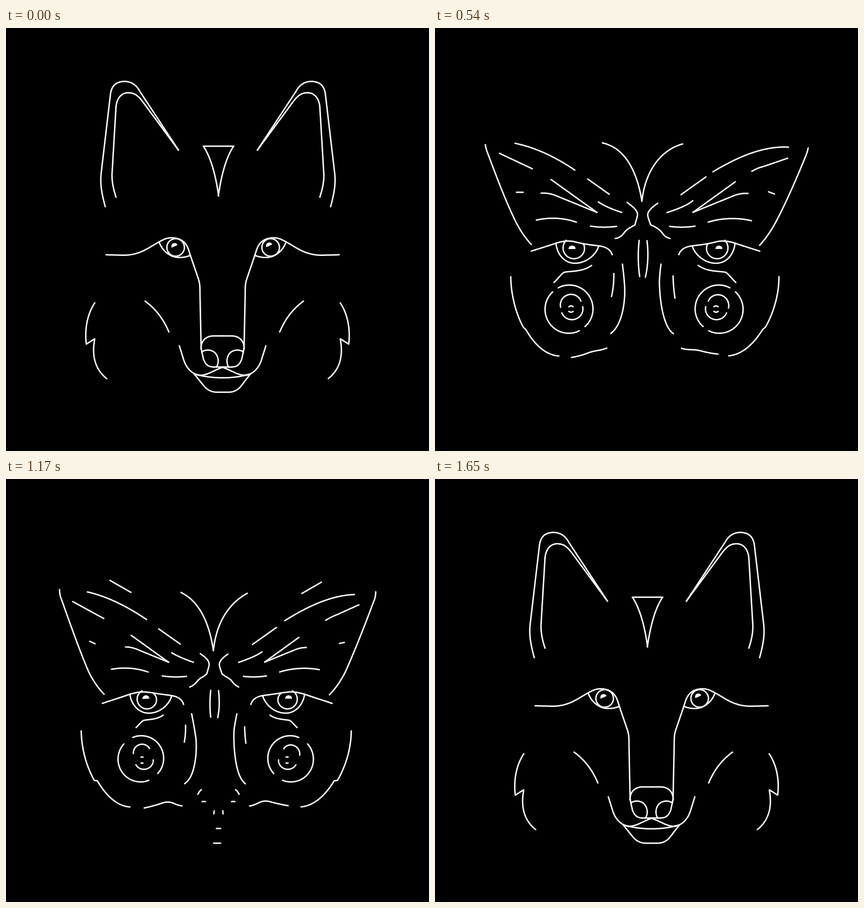
Write an HTML page that moves like this. It is 748 by 748 pixels and loops after 2.19 s.

```html
<!DOCTYPE html>
<html lang="en">
<head>
<meta charset="utf-8">
<title>Wolf and moth</title>
<style>
  html, body { margin: 0; width: 100%; height: 100%; overflow: hidden; background: #000; }
  svg { display: block; width: 100%; height: 100%; }
  path { fill: none; stroke: #fff; stroke-width: 2.5; stroke-linecap: round; stroke-linejoin: round; }
  path.glint { fill: #fff; stroke: none; }
</style>
</head>
<body>
<svg id="stage" viewBox="0 0 748 748"></svg>
<script>
const LOOP = 2190, TICK = 60, SAMPLES = 100;
const POSES = [0, 2, 6, 10, 11];   // steps at which every pose is defined
const stage = document.getElementById('stage');
const probe = newPath();
const strokes = [], glints = [];

function newPath(cls) {
  const p = document.createElementNS('http://www.w3.org/2000/svg', 'path');
  if (cls) p.setAttribute('class', cls);
  return p;
}

// Elliptical arc between two angles in degrees, built from two halves
function arc(cx, cy, rx, ry, a, b) {
  const at = deg => {
    const r = deg * Math.PI / 180;
    return `${cx + rx * Math.cos(r)} ${cy + ry * Math.sin(r)}`;
  };
  const seg = `A${rx} ${ry} 0 0 1 `;
  return `M${at(a)}${seg}${at((a + b) / 2)}${seg}${at(b)}`;
}
const ring = (cx, cy, r, a, b) => arc(cx, cy, r, r, a, b);

function sample(d) {
  if (!d) return null;
  probe.setAttribute('d', d);
  const len = probe.getTotalLength();
  return Array.from({ length: SAMPLES }, (_, i) => {
    const p = probe.getPointAtLength(len * i / (SAMPLES - 1));
    return [p.x, p.y];
  });
}

function addStroke(keys) {
  const el = newPath();
  stage.appendChild(el);
  strokes.push({ el, keys });
}

const solo = ds => addStroke(ds.map(sample));

// Left stroke plus its mirror image; sums[i] is left x + right x in pose i
function pair(ds, sums, right = {}) {
  const left = ds.map(sample);
  addStroke(left);
  addStroke(left.map((pts, i) => right[i] ? sample(right[i])
    : pts && pts.map(([x, y]) => [sums[i] - x, y])));
}

function glint(keys) {
  const el = newPath('glint');
  el.setAttribute('d', 'M-6 3C-6-5 6-5 6 3Z');
  stage.appendChild(el);
  glints.push({ el, keys });
}

// Ears, turning into the wing edges and veins
pair(['M200 96C191 98 185.5 107 184.5 119L168.5 255C166 275 169 292 175.5 316',
  'M131 148C120 154 117 166 121.5 177L166 311C172 328 182 344 196.5 359',
  'M106.5 174C104 181 104.5 187 107 193L148 324C153 342 164 361 180 376',
  'M83 217C112 290 136 350 167 385',
  'M77 268L160 381'], [749.5, 747.5, 748, 0, 747],
  { 3: 'M666 225C640 285 608 350 576 387' });
pair(['M200 96C203 95 206 94.5 209 94.5C221 94.5 230 100 236 111L305 216',
  'M131 148C136 144 141 142 147 142C156 142 162 144 168 148L276 212',
  'M126 158C137 155 148 158 158 164.5L276 232', null, null], [749.5, 747.5, 0],
  { 2: 'M610.5 157C602 157 596 160 588 165L472 232' });
pair(['M194.5 140C196 122 206 114.5 216 114.5C228 114.5 234 120 243 132L305 216',
  'M150 159.5C159 159 164 162 170 166L257 225',
  'M149 191.5C181 200 215 218 251 243',
  'M139 208C177 215 213 232 246 254',
  'M92 213.5C137 197 192 214 246 246'], [749.5, 748, 747, 0, 747],
  { 3: 'M634 217C585 211 537 231 490 258' });
pair([null, 'M305 286.5L307.5 288', 'M270 261L308.5 288', 'M270 269L308 296',
  'M246 246C270 260 291 274 311 288'], [0, 743, 746.5, 0, 747],
  { 3: 'M480 264L434 297' });
pair(['M194.5 140L187.5 258C187 272 190 285 194.5 299', 'M144 190L202 296',
  'M126 207L175 242.5', 'M110 226.5L171 251',
  'M104 240L160 240C175 240 184 243 193 249'], [749.5, 747.5, 751, 0, 745],
  { 3: 'M623 238L580 249C567 251 563 253 555 257' });
pair([null, null, 'M254 293.5L290 320', 'M189 259.5L285 328', 'M193 249L286 320'],
  [0, 0, 750, 0, 744], { 2: 'M492 296L460 319.5', 3: 'M544 264L455 328' });
pair([null, null, 'M156 280L161 293', 'M140 294L154 289.5', 'M113 284.5L160 279'],
  [0, 0, 750.5, 0, 744], { 3: 'M602 298L590 288.5' });
pair([null, null, 'M259 307L290 320', 'M164 287C178 286 187 288 199 293L285 328',
  'M160 279C178 276.5 188 279 199 284L286 320'], [0, 0, 750, 740, 744],
  { 2: 'M486 309L460 319.5' });

// Forehead lines
pair([null, 'M331.5 320.5L334.5 321.5', 'M301 306.5C312 311 322 315 333.5 320',
  'M285 308C297 317 312 323 329 328', 'M280 293.5C297 306 314 314 332 320'],
  [0, 747.5, 747.5, 0, 744], { 3: 'M459 305C447 316 427 323 409 328.5' });
pair([null, 'M249 336.5L252 337.5', 'M201 330C222 329 239 332 253 337',
  'M172 343C197 336 225 337 249 345.5', 'M164 337C190 327.5 225 327.5 252 337'],
  [0, 736.5, 0, 0, 736.5],
  { 2: 'M543 330C522 329 502 332 486 337', 3: 'M565 344.5C541 337 508 337 482 345.5' });
pair([null, 'M304.5 346L308 346', 'M279 344C290 345.5 302 346 315 345.5',
  'M274 352.5C290 355 307 355 323 352.5', 'M278 344C296 347 313 346 330 343'],
  [0, 740.5, 0, 733, 710.5], { 2: 'M462 344C452 345.5 442 346 430 345.5' });
pair([null, 'M359.5 328.5L358.5 330.5',
  'M351 309.5C360 314 363 320 361 327C359 334 358 338 356 343C347 346 343 350 338 359',
  'M336 308C348 318 356 323 357 331C357 337 354 343 352 352C340 355 335 361 331 366C326 374 320 377 312 376.5',
  'M337.5 299C350 310 359 317 360 325C360 331 357 336 355 343C343 347 340 352 335 358C328 368 318 368 298 367.5'],
  [0, 737.5, 741, 0, 737],
  { 3: 'M395 310C382 320 375 326 375 333C376 340 379 346 381 352C390 353 396 358 402 364C407 373 412 376 420 376.5' });

// Blaze, turning into the antennae, and the body below
pair(['M349 209C363 230 371 262 376 297', 'M340.5 200.5C354 222 361 253 367 297',
  'M335.5 195C352 224 364 255 368.5 298', 'M283 206C326 207 354 246 365 309',
  'M262 209C309 211 347 252 367.5 300'], [751.5, 734.5, 0, 0, 736],
  { 2: 'M404.5 196C385 230 372 255 368.5 298', 3: 'M449 208C405 212 372 250 365 309',
    4: 'M475 209C428 214 388 255 367.5 300' });
solo(['M349 209L402.5 209', 'M361.5 203L371 203', null, null, null]);
pair([null, null, 'M364 370L362 384', 'M360 377.5C357 405 358 435 362 458',
  'M362 369.5C359 408 362 440 368.5 468'], [0, 0, 741.5, 0, 738],
  { 3: 'M374 378C377.5 405 376 435 369.5 459.5' });

// Eyes
pair(['M177 401L206 401.8C240 402 254 386 276 375.5C289 368 307 370 316 380C322 387 323 393 326 402',
  'M169 401C194 400 217 394 239 388C258 381 266 373 284 373C300 373 308 380 313 389',
  'M171 401C190 394 210 388 229 380C245 374 254 372 262 373C278 375 290 377 300 379C309 382 314 387 315.5 394',
  'M170 392.5L209 380.5C222 375 238 375 248 380C262 386 275 386 290 388C304 390 310 396 312.5 403',
  'M160 381L211 367.5C225 365 240 369 256 374C271 378 283 379 297 380C309 382 312 387 314 394'],
  [766, 749, 752, 742, 746.5]);
pair(['M271 379C276 392 284 399 294 403.5C304 407.5 316 406 326 402',
  'M239 388C247 399 258 407.5 274 407.5C290 407.5 302 399 312 386',
  'M229 380C233 396 245 410 263 410C281 410 296 396 300 379',
  'M209 381C210 402 224 418 242 418C263 418 281 403 286 388',
  'M179 376C182 394 198 407 221 407C243 407 262 394 264.5 376'],
  [766, 749, 752, 742, 746.5]);
pair([ring(300, 388, 15.5, -90, 270), ring(272.5, 390.5, 15.5, -90, 270),
  ring(257.5, 388.5, 15.3, -90, 270), ring(242.5, 387.5, 22, -6, 211),
  ring(213.5, 379, 22, -31, 199)], [768, 749, 752, 742, 745]);
// x, y, rotation, scale
glint([[297, 383.5, -24, .95], [268, 388.5, -45, .95], [257, 381, -6, 1], [237.5, 390, 0, 1.05], [214.5, 377.5, -4, 1.2]]);
glint([[464.5, 382.5, -24, .95], [481, 388.5, 45, .95], [495, 381, 0, 1], [504.5, 390, 0, 1.05], [532, 377.5, 4, 1.2]]);

// Sides of the muzzle, turning into wing folds
pair(['M326 402L340 443C343 452 343 458 343 468L345 566',
  'M313 389L331 441C334 452 334 460 334 476L331.5 553',
  'M322 410.5L337 455C342 478 341 515 335 526C332 531 330 533 326 536',
  'M334.5 420C338 470 334 517 306 541.5',
  'M339 428C340 452 336 475 328 495'], [766, 749, 0, 0, 731.5],
  { 2: 'M425.5 410.5L416 438C413 460 412 500 418 520C421 529 424 532 426.5 536',
    3: 'M391 420C387 470 400 532 420 542' });
pair([null, null, 'M280 413L269 418.5', 'M276 422C255 437 232 434 214 437C207 441 204 447 191 460.5',
  'M278.5 413C259 425 236 426 221 427.5C211 429 208 440 180.5 465.5'], [0, 0, 749.5, 740, 745.5]);
pair([null, null, 'M320 438L321.5 447', 'M315 433C315 452 313 468 309 484',
  'M318.5 415C318 455 312 490 297 506.5'], [0, 0, 0, 0, 738],
  { 2: 'M424 438L424 446', 3: 'M420 438.5C420.5 457 422 473 424.5 488.5',
    4: 'M422.5 418.5C422 460 427 492 439 506.5' });

// Cheeks, turning into the lower wings and their eyespots
pair(['M157 486C143 507 139 534 142 559L157 549.5C151 580 158 604 178 620',
  'M127 490C122 516 125 543 137 564.5L148 550.5C152 580 168 603 190 611',
  'M131 457C132 488 141 517 157 542L163 534C180 562 198 578 219.5 580',
  'M135 434C135 500 170 577 219 580',
  'M142 420C139 462 170 567 235 568'], [748, 0, 746, 0, 0],
  { 1: 'M616.5 495.5C617 522 609 547 592 567L584 551C575 577 556 600 530 602',
    3: 'M606 434C607 495 568 575 517 579.5',
    4: 'M605 420C608 462 573 567 501 567' });
pair(['M246 483C265 497 278 514 288 537.5', 'M231 477.5C256 478 277 506 278.5 536.5',
  arc(241.5, 490, 36.5, 38, -98, 26), ring(235.5, 499.5, 44.5, -122, 53),
  ring(238, 490.5, 44.5, -123, 57)], [772, 0, 746.5, 737, 742],
  { 1: 'M529 480C503 489 487 513 486.5 538' });
pair([null, 'M219 518C214 513 210 508 208 501.5', arc(241.5, 490, 36.5, 38, 81, 208),
  ring(235.5, 499.5, 44.5, 60, 231), ring(238, 490.5, 44.5, 57, 237)],
  [0, 745.5, 746.5, 737, 742]);
pair([null, null, ring(245, 487, 22.5, -126, -88), ring(240.5, 495.5, 22.5, -197, -17),
  ring(243, 487, 22.5, -197, -17)], [0, 0, 0, 737.5, 742.5],
  { 2: 'M520 474.5C517 470 513 467 507 465' });
pair([null, null, ring(245, 487, 22, 52, 102), ring(240.5, 495.5, 22.5, -17, 163),
  ring(243, 487, 22.5, -17, 163)], [0, 0, 747, 737.5, 742.5]);
pair([null, null, null, ring(240.5, 497, 5.5, 200, 340), ring(243, 488, 5.5, 180, 360)],
  [0, 0, 0, 737.5, 742.5]);
pair([null, null, null, ring(240.5, 497, 5.5, 20, 160), ring(243, 488, 5.5, 0, 180)],
  [0, 0, 0, 737.5, 742.5]);

// Mouth and chin
pair(['M306.5 562L314 586C320 606 335 615 345 614C358 613 366 606 383 600',
  'M294 562C300 564 303 568 304.5 573C311 590 314 596 322 602C331 611 342 614 349.5 611',
  'M251 580L290 569C301 568 307 573 312 582C317 591 319 595 326.5 602',
  'M238 583.5C260 581 280 571 296 554', 'M235 568C268 568 300 537 323 515'],
  [766, 750.5, 747, 0, 0],
  { 3: 'M502 575.5C478 575 455 567 441 554.5', 4: 'M501 567C470 567 438 542 413 521' });
solo(['M333 612L350 633C357 641 364 644 374 644L392 644C402 644 409 641 415 634L432 612',
  'M321 602L342 633C348 641 355 644 364 644L385 644C395 644 402 640 407 633L428 603',
  'M350 640C355 643 359 644 366 644L383 644C390 644 393 643 397 641', null, null]);
solo(['M334 612C352 617 367 618.5 383 618.5C399 618.5 414 617 431 612',
  'M354.5 616.5C368 618.5 382 618.5 396 616.5', 'M361 617Q376 619 390.5 617', null, null]);

// Nose
pair(['M345 568C344 553 354 544.5 367 544.5L383 544.5', 'M338 573C334 556 345 544 360 544L375 544',
  'M338.5 573C335 556 345 545 360 544', null, null], [766, 749.5, 751.5]);
pair(['M345 566L349 585C353 596 358 599 367 599.5', 'M341 583C342 591 346 597 353 598', null, null, null],
  [766, 749.5]);
solo(['M367 599.5L399 599.5', 'M369.5 599.5L380 599.5', null, null, null]);
pair(['M346 573C352 568 365 568 371 576', 'M338 573C345 568 356 569 361.5 575',
  'M338.5 573C346 569 355 569.5 360.5 574', null, null], [766, 749.5, 751.5]);
pair(['M371 576C377 584 376 594 372 599.5', 'M361.5 575C368 583 368 592 363 599.5',
  'M365.5 579C370 585 368 594 364 599.5', null, null], [766, 749.5, 751.5]);

const mix = (a, b, u) => a.map((v, i) => v + (b[i] - v) * u);

function trim(pts, amount) {
  if (amount <= 0) return null;
  const edge = Math.round((SAMPLES - 1) * (1 - amount) / 2);
  return pts.slice(edge, SAMPLES - edge);
}

function shape(a, b, u) {
  if (a && b) return a.map((p, i) => mix(p, b[i], u));
  if (a) return trim(a, 1 - 1.5 * u);
  if (b) return trim(b, 1 - 1.5 * (1 - u));
  return null;
}

function draw(step) {
  let k = 0;
  while (k < POSES.length - 2 && step >= POSES[k + 1]) k++;
  const u = (step - POSES[k]) / (POSES[k + 1] - POSES[k]);
  for (const { el, keys } of strokes) {
    const pts = shape(keys[k], keys[k + 1], u);
    el.setAttribute('d', pts ? 'M' + pts.map(p => p[0].toFixed(2) + ' ' + p[1].toFixed(2)).join('L') : '');
  }
  for (const { el, keys } of glints) {
    const [x, y, turn, size] = mix(keys[k], keys[k + 1], u);
    el.setAttribute('transform', `translate(${x} ${y}) rotate(${turn}) scale(${size})`);
  }
}

// Eleven ticks out to the moth, a rest, and the same way back
function stepAt(t) {
  const out = Math.floor(t / TICK), back = 11 - Math.floor((t - 990) / TICK);
  return Math.max(0, Math.min(out, 11, back));
}

let shown = -1;
const start = performance.now();
function frame() {
  const step = stepAt((performance.now() - start) % LOOP);
  if (step !== shown) draw(shown = step);
  requestAnimationFrame(frame);
}
frame();
</script>
</body>
</html>
```
